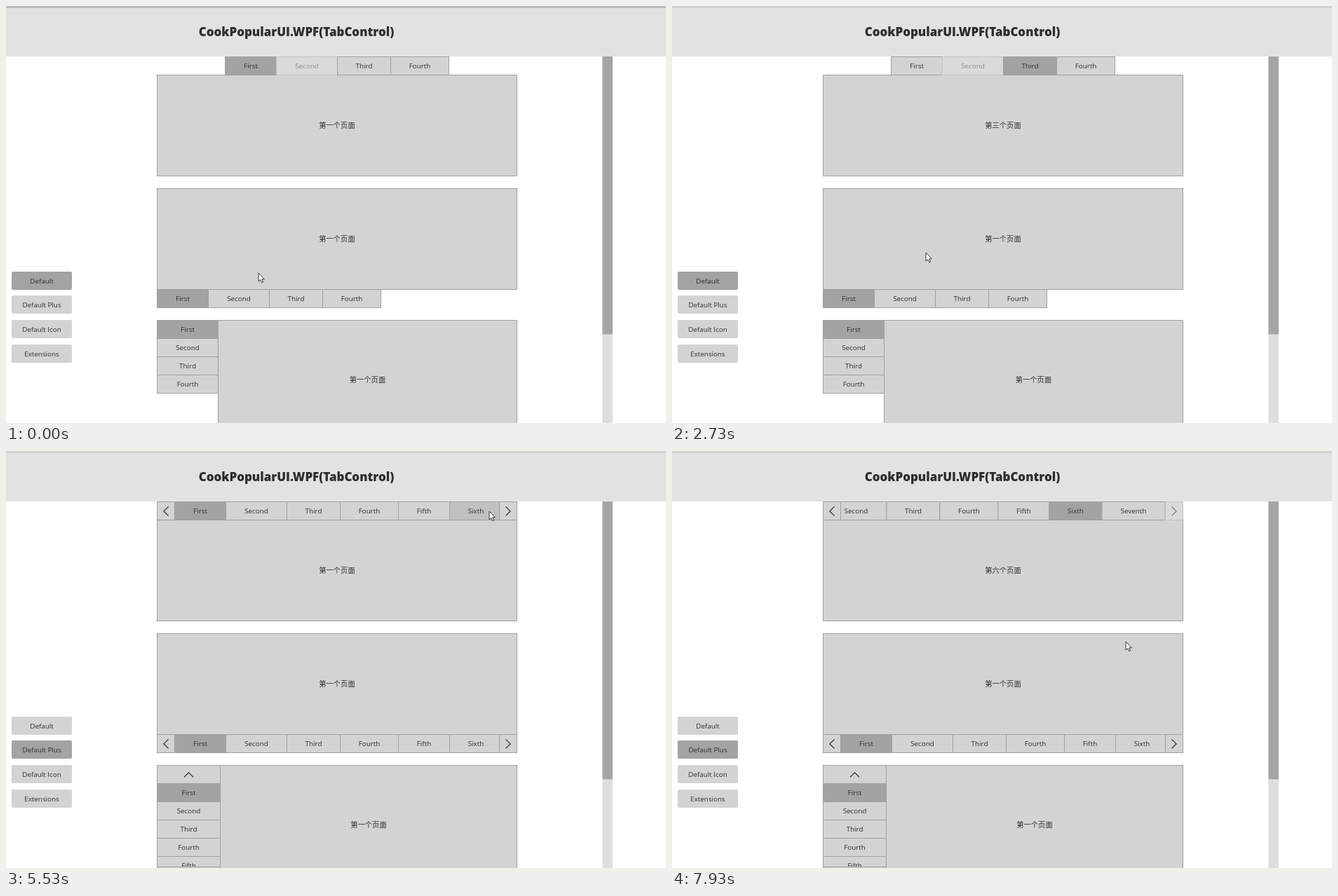
Recreate the animation shown at these times as an HTML page. Size 941 by 595 pixels, loop 8000 ms.

```html
<!DOCTYPE html>
<html lang="en">
<head>
<meta charset="utf-8">
<title>TabControl demo</title>
<style>
  html, body { margin: 0; height: 100%; overflow: hidden; background: #fff; }
  svg#stage { display: block; width: 100vw; height: 100vh; }
  text { font: 9.85px "Open Sans", "Noto Sans", sans-serif; fill: #2d2d2d; text-anchor: middle; }
  .title { font-size: 16.95px; font-weight: 800; }
  .page text { font: 10.28px "Noto Sans CJK SC", "Noto Sans CJK", sans-serif; }
  .tab rect, .page rect { fill: #d3d3d3; stroke: #a0a0a0; }
  .nav rect { fill: #d3d3d3; }
  .hover rect { fill: #c1c1c1; }
  .selected rect { fill: #a3a3a3; }
  .disabled rect { fill: #dadada; stroke: #c2c2c2; }
  .disabled text { fill: #8e8e8e; }
  .chevron { fill: none; stroke: #2d2d2d; stroke-width: 1.3; }
  .disabled .chevron { stroke: #777; }
  .ripple { fill: #fff; }
</style>
</head>
<body>
<svg id="stage" viewBox="0 0 941 595">
  <defs>
    <clipPath id="rowClip"><rect x="241" y="72" width="462" height="27"/></clipPath>
    <clipPath id="columnClip"><rect x="215" y="474" width="91" height="120"/></clipPath>
  </defs>
  <rect width="941" height="72" fill="#e2e2e2"/>
  <rect id="titleBar" width="941" height="3"/>
  <text class="title" x="414" y="42.8">CookPopularUI.WPF(TabControl)</text>
  <rect x="850.4" y="72" width="14.5" height="523" fill="#dedede"/>
  <rect x="850.4" y="72" width="14.5" height="396.4" fill="#a5a5a5"/>
  <g id="nav"></g>
  <g id="basic"></g>
  <g id="plus"></g>
  <path id="cursor" d="M0 0V12L2.8 9.5 4.8 13.8 6.7 13 4.8 8.8H8.4Z" fill="#fff" stroke="#222" stroke-width=".9"/>
</svg>
<script>
const LOOP = 8000, STEP = 200 / 3;
const ROW = 26, TOP = 72.5, MIDDLE = 260.5, BOTTOM = 448.5, LEFT = 215.5, RIGHT = 728.5;
const widths = { First: 73, Second: 87, Third: 76, Fourth: 83, Fifth: 73, Sixth: 75, Seventh: 90 };
const names = Object.keys(widths);
const el = id => document.getElementById(id);

const box = (x, y, w, h, extra = '') => `<rect x="${x}" y="${y}" width="${w}" height="${h}" ${extra}/>`;

const tab = (id, x, y, w, label) =>
  `<g id="${id}" class="tab">${box(x, y, w, ROW)}<text x="${x + w / 2}" y="${y + 16.8}">${label}</text></g>`;

function tabRow(prefix, x, y, count) {
  return names.slice(0, count).map(name => {
    const html = tab(prefix + name, x, y, widths[name], name);
    x += widths[name];
    return html;
  }).join('');
}

const tabColumn = (prefix, y, w, count) =>
  names.slice(0, count).map((name, i) => tab(prefix + name, LEFT, y + i * ROW, w, name)).join('');

const page = (id, x, y, h) =>
  `<g class="page" lang="zh-CN">${box(x, y, RIGHT - x, h)}<text id="${id}" x="${(x + RIGHT) / 2}" y="${y + h / 2 + 3.5}">第一个页面</text></g>`;

const arrow = (id, x, y, w, d) =>
  `<g id="${id}" class="tab">${box(x, y, w, ROW)}<path class="chevron" transform="translate(${x + w / 2} ${y + ROW / 2 + 0.4})" d="${d}"/></g>`;

const rippleBox = (id, x, y, w, cx, cy) =>
  `<svg x="${x}" y="${y}" width="${w}" height="${ROW}"><circle id="${id}" class="ripple" cx="${cx}" cy="${cy}"/></svg>`;

const toLeft = 'M3.5-6.5-3 0 3.5 6.5', toRight = 'M-3.5-6.5 3 0-3.5 6.5';
const toTop = 'M-6.5 3.5 0-3 6.5 3.5', toBottom = 'M-6.5-3.5 0 3 6.5-3.5';

el('nav').innerHTML = ['Default', 'Default Plus', 'Default Icon', 'Extensions'].map((label, i) => {
  const y = 379 + Math.floor(i * 34.8);
  return `<g id="nav${i}" class="nav">${box(8, y, 86, ROW, 'rx="2"')}<text x="51" y="${y + 17}">${label}</text></g>`;
}).join('');

el('basic').innerHTML =
  page('basicPage1', LEFT, TOP + ROW, 144) + tabRow('a', 312.5, TOP, 4) +
  rippleBox('rippleThird', 472.5, TOP, 76, 35, 10) +
  page('basicPage2', LEFT, MIDDLE, 144) + tabRow('b', LEFT, MIDDLE + 144, 4) +
  rippleBox('rippleSecond', 288.5, MIDDLE + 144, 87, 43, 6) +
  page('basicPage3', 302.5, BOTTOM, 170) + tabColumn('c', BOTTOM, 87, 4);

el('plus').innerHTML =
  page('plusPage1', LEFT, TOP + ROW, 144) +
  `<g clip-path="url(#rowClip)"><g id="scroller">${tabRow('d', 240.5, TOP, 7)}${rippleBox('rippleSixth', 632.5, TOP, 75, 41, 15.5)}</g></g>` +
  arrow('dPrev', LEFT, TOP, 25, toLeft) + arrow('dNext', 703.5, TOP, 25, toRight) +
  page('plusPage2', LEFT, MIDDLE, 144) + tabRow('e', 240.5, MIDDLE + 144, 6) +
  arrow('ePrev', LEFT, MIDDLE + 144, 25, toLeft) + arrow('eNext', 703.5, MIDDLE + 144, 25, toRight) +
  page('plusPage3', 305.5, BOTTOM, 170) +
  `<g clip-path="url(#columnClip)">${tabColumn('f', BOTTOM + ROW, 90, 5)}</g>` +
  arrow('fPrev', LEFT, BOTTOM, 90, toTop) + arrow('fNext', LEFT, 593.5, 90, toBottom);

const setState = (id, state) => el(id).setAttribute('class', `${id.startsWith('nav') ? 'nav' : 'tab'} ${state}`);
for (const id of ['cFirst', 'eFirst', 'fFirst']) setState(id, 'selected');
setState('aSecond', 'disabled');

// Pointer waypoints: time, x, y
const track = [
  [0, 360, 381], [130, 364, 363], [200, 364, 363], [400, 325, 295], [530, 250, 256], [670, 175, 300],
  [800, 124, 377], [930, 75, 430], [1000, 62, 446], [1070, 58, 411], [1400, 200, 310], [1670, 400, 155],
  [1870, 500, 86], [1930, 507, 81], [2200, 507, 81], [2330, 490, 115], [2600, 390, 300], [2870, 331, 408],
  [3070, 331, 408], [3530, 66, 424], [3670, 62, 438], [3730, 60, 430], [3930, 60, 430], [4270, 200, 300],
  [4600, 430, 167], [4800, 515, 136], [5070, 620, 100], [5270, 674, 86], [5400, 674, 86], [5730, 711, 85],
  [6400, 711, 85], [6530, 715, 85], [7470, 715, 85], [7930, 647, 272], [LOOP, 647, 272]
];

function pointerAt(t) {
  const i = track.findIndex(point => point[0] > t);
  const [t0, x0, y0] = track[i - 1], [t1, x1, y1] = track[i];
  const p = (t - t0) / (t1 - t0);
  return [x0 + (x1 - x0) * p, y0 + (y1 - y0) * p];
}

function ripple(id, age) {
  const visible = age >= 0 && age < 500;
  el(id).setAttribute('r', visible ? 10 + age * 0.12 : 0);
  el(id).setAttribute('opacity', visible ? 0.2 * (1 - age / 500) : 0);
}

function render(t) {
  const within = (from, to) => t >= from && t < to;
  const pick = (selected, hovered) => selected ? 'selected' : hovered ? 'hover' : '';
  const thirdPicked = t >= 2200, secondPicked = t >= 3070, plusShown = t >= 3930, sixthPicked = t >= 6670;

  el('titleBar').setAttribute('fill', thirdPicked ? '#d2d2d2' : '#bdbdbd');
  el('basic').setAttribute('display', plusShown ? 'none' : 'inline');
  el('plus').setAttribute('display', plusShown ? 'inline' : 'none');

  setState('nav0', pick(!plusShown));
  setState('nav1', pick(t >= 4800, within(930, 1000) || t >= 3470));

  setState('aFirst', pick(!thirdPicked));
  setState('aThird', pick(thirdPicked, t >= 1870));
  el('basicPage1').textContent = `第${thirdPicked ? '三' : '一'}个页面`;
  ripple('rippleThird', t - 2200);

  setState('bFirst', pick(!secondPicked));
  setState('bSecond', pick(secondPicked, t >= 2870));
  el('basicPage2').textContent = `第${secondPicked ? '二' : '一'}个页面`;
  ripple('rippleSecond', t - 3070);

  setState('dFirst', pick(!sixthPicked));
  setState('dSixth', pick(sixthPicked, t >= 5200));
  setState('dNext', t >= 7530 ? 'disabled' : '');
  el('plusPage1').textContent = `第${sixthPicked ? '六' : '一'}个页面`;
  ripple('rippleSixth', t - 6670);

  const p = Math.min(1, (t - 6585) / 920);
  const shift = sixthPicked ? -94.6 * (1 - (1 - p) ** 2) : 0;
  el('scroller').setAttribute('transform', `translate(${shift})`);

  el('cursor').setAttribute('transform', `translate(${pointerAt(t).map(Math.round)})`);
}

const start = performance.now();
function tick() {
  const t = (performance.now() - start) % LOOP;
  render(Math.round(Math.floor((t + 4) / STEP) * STEP / 10) * 10 % LOOP);
  requestAnimationFrame(tick);
}
tick();
</script>
</body>
</html>
```
